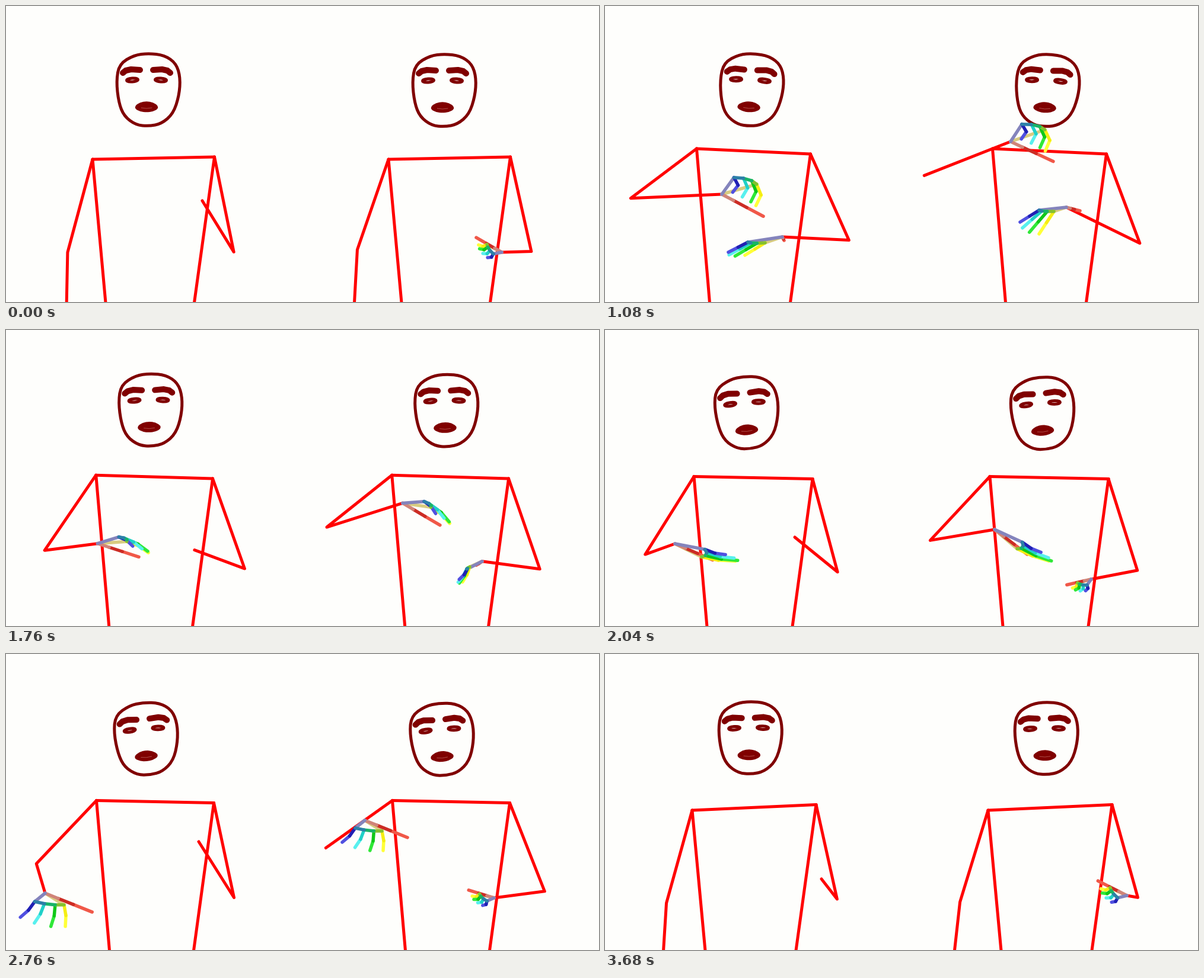
Recreate the animation shown at these times as an HTML page with a canvas. Size 1000 by 500 pixels, loop 3.72 s.

```html
<!DOCTYPE html>
<html lang="en">
<head>
<meta charset="utf-8">
<title>Signing figures</title>
<style>
html, body { margin: 0; width: 100%; height: 100%; overflow: hidden; background: #fefefc; }
canvas { display: block; }
</style>
</head>
<body>
<canvas id="stage" width="1000" height="500"></canvas>
<script>
const ctx = document.getElementById('stage').getContext('2d');
const LOOP = 3720, STEP = 40;
const TIMES = [0, 520, 1080, 1480, 2040, 2760, 3680];
const BG = '#fefefc', RED = '#ff0000', MAROON = '#800000';
const RAD = Math.PI / 180;

// Both people share these: shoulders (x, y, x, y), point between the eyes, head tilt in degrees
const torso = [
  [146, 259, 351.5, 255, 237, 125, 0],
  [149.5, 244.5, 351, 248.5, 242.5, 120.5, 1],
  [154.5, 241, 346.5, 250, 245, 125, 3],
  [154, 242.5, 347, 250.5, 246, 126, 3],
  [150, 247.5, 350, 251.5, 235, 123.5, -5],
  [152.5, 247.5, 350.5, 251.5, 232.5, 127, -5],
  [147, 264, 356, 254.5, 242, 125, -1]
];

// Hand shapes around the wrist: thumb tip, index and little knuckles,
// index and little fingertips, bend of the fingers
const SHAPES = {
  hang: [72, 29, 29, 18, -16, 13, 31, 51, -38, 37, 2],
  cup: [73, 31, 57, -22, 18, -30, 59, 14, 18, -5, 8],
  flat: [65, 24, 46, 20, 51, 7, 103, 24, 86, 14, -2],
  slope: [-23, 6, 21, 7, 46, 5, 46, 45, 78, 25, 0],
  reach: [-3, 6, 29, 10, 58, 9, 63, 31, 91, 26, 0],
  fist: [45, -21, 26, -11, 14, 4, 40, -9, 23, 11, -3]
};

// Each arm: swing from straight down, wrist, hand shape, its turn and scale
const people = [
  { x: 0, y: 0, arms: [
    arm(-1, [[15, 102, 510], [42, 18, 295], [53, 197, 318, 'cup', 5], [40, 189, 359, 'cup', -8],
      [32, 118, 361, 'flat', 3], [43.5, 66, 404, 'hang', 0, 1.1], [15.5, 98, 510]]),
    arm(1, [[11.5, 331, 329], [27.5, 376, 392, 'hang', -8], [24, 299, 390, 'reach'],
      [24, 314, 391, 'reach', 7], [15, 320, 350], [12, 325, 317], [12.5, 365, 380]])
  ] },
  { x: 499, y: 1, arms: [
    arm(-1, [[19, 88, 510], [57, 9, 268, 'hang', 0, .65], [68.5, 185, 229, 'cup', 2],
      [62.5, 178, 237, 'cup'], [43, 158, 337, 'flat', 17], [54.5, 106, 281, 'hang'], [17, 90, 505]]),
    arm(1, [[12.5, 337, 416, 'fist', -5], [32, 411, 389, 'hang'], [20.5, 279, 340, 'slope'],
      [21, 285, 355, 'slope', 11], [17.5, 321, 421, 'fist', 38, .85],
      [21.5, 324, 412, 'fist', 8, .9], [15.5, 381, 408, 'fist', -2, 1.1]])
  ] }
];

function shapeRow(side, name, turn = 0, scale = 1) {
  const s = SHAPES[name], c = Math.cos(turn * RAD) * scale, n = Math.sin(turn * RAD) * scale;
  const row = [];
  for (let k = 0; k < 10; k += 2) {
    row.push(-side * (s[k] * c - s[k + 1] * n), s[k] * n + s[k + 1] * c);
  }
  return [...row, -side * s[10]];
}

function arm(side, keys) {
  const known = keys.map(([, , , name, ...fit]) => name ? shapeRow(side, name, ...fit) : null);
  // Gaps take the shape of the nearest known hand
  const hand = known.map((row, i) => {
    for (let d = 0; !row; d++) row = known[i - d] || known[i + d];
    return row;
  });
  return { side, shown: known.map(Boolean), hand, joints: keys.map(k => k.slice(0, 3)) };
}

function spanAt(t) {
  let i = 0;
  while (i < TIMES.length - 2 && t >= TIMES[i + 1]) i++;
  return { i, u: Math.min(1, (t - TIMES[i]) / (TIMES[i + 1] - TIMES[i])) };
}

// Smooth cubic path through the rows
function poseAt(rows, t) {
  const { i, u } = spanAt(t), dt = TIMES[i + 1] - TIMES[i];
  const slope = (k, c) => {
    const a = Math.max(k - 1, 0), b = Math.min(k + 1, TIMES.length - 1);
    return (rows[b][c] - rows[a][c]) / (TIMES[b] - TIMES[a]) * dt;
  };
  const u2 = u * u, u3 = u2 * u;
  return rows[i].map((p, c) =>
    (2 * u3 - 3 * u2 + 1) * p + (u3 - 2 * u2 + u) * slope(i, c) +
    (3 * u2 - 2 * u3) * rows[i + 1][c] + (u3 - u2) * slope(i + 1, c));
}

const mix = (a, b, u) => [a[0] + (b[0] - a[0]) * u, a[1] + (b[1] - a[1]) * u];

function stroke(color, width) {
  ctx.strokeStyle = color;
  ctx.lineWidth = width;
  ctx.stroke();
}

function line(points, color, width) {
  ctx.beginPath();
  points.forEach(p => ctx.lineTo(...p));
  stroke(color, width);
}

// Closed smooth curve guided by the points
function loop(points, color, width) {
  const n = points.length;
  ctx.beginPath();
  ctx.moveTo(...mix(points[n - 1], points[0], .5));
  points.forEach((p, i) => ctx.quadraticCurveTo(...p, ...mix(p, points[(i + 1) % n], .5)));
  ctx.closePath();
  stroke(color, width);
}

const OUTLINE = [
  [-21, -42], [3, -45], [30, -42], [50, -28], [57, -4], [55, 26], [45, 57],
  [25, 74], [4, 78], [-18, 76], [-38, 61], [-47, 38], [-51, 2], [-46, -27]
];
const BROW = [[-40, -12], [-35, -16], [-26, -18], [-11, -17]];
const LIPS = [[-19, 1], [-10, -5], [0, -6.5], [10, -5], [19, 1], [10, 6], [0, 7], [-10, 6]];

function drawFace(x, y, tilt) {
  ctx.save();
  ctx.translate(x, y);
  ctx.rotate(tilt * RAD);
  loop(OUTLINE, MAROON, 5);
  for (const s of [-1, 1]) {
    line(BROW.map(([bx, by]) => [-s * bx, by]), MAROON, 10);
    ctx.beginPath();
    ctx.ellipse(s * 24, 0, 9.5, 2.9, s * .06, 0, 2 * Math.PI);
    stroke(MAROON, 5);
  }
  ctx.translate(0, 45);
  loop(LIPS, MAROON, 5);
  ctx.fillStyle = MAROON;
  ctx.fill();
  line([[-9, 2], [0, 3], [9, 2]], '#b8605a', .8);
  ctx.restore();
}

const FINGERS = [
  ['#f5ee14', '#ffff38'], ['#10c818', '#30e838'],
  ['#20d0c8', '#58f0ee'], ['#2020b4', '#5050e0']
];
const LINKS = ['#84c030', '#18b468', '#2c80a8'];

// Four evenly spread points, the middle two bulging away from the wrist
const fan = (a, b) => [0, 1, 2, 3].map(k => {
  const bulge = k % 3 ? 1.1 : 1;
  return mix(a, b, k / 3).map(v => v * bulge);
});

function drawHand(x, y, h) {
  const [thumb, first, last, tipA, tipB] = [0, 2, 4, 6, 8].map(k => [h[k], h[k + 1]]);
  const bend = h[10], W = 5.5, wrist = [0, 0];
  const knuckles = fan(first, last), tips = fan(tipA, tipB);
  const base = mix(wrist, thumb, .28), joint = mix(wrist, thumb, .6);
  ctx.save();
  ctx.translate(x, y);
  line([wrist, first], '#d8cc80', W);
  line([joint, thumb], '#f05848', W);
  line([base, joint], '#cc2c24', W);
  line([wrist, base], '#d08478', W);
  line([wrist, last], '#8484bc', W);
  knuckles.forEach((k, i) => {
    const dx = tips[i][0] - k[0], dy = tips[i][1] - k[1], len = Math.hypot(dx, dy) || 1;
    const push = Math.sign(bend) * Math.min(Math.abs(bend), len * .4) / len;
    const mid = [k[0] + dx * .5 + dy * push, k[1] + dy * .5 - dx * push];
    line([mid, tips[i]], FINGERS[i][1], W);
    line([k, mid], FINGERS[i][0], W);
  });
  LINKS.forEach((c, i) => line([knuckles[i], knuckles[i + 1]], c, W));
  ctx.restore();
}

function drawPerson({ x, y, arms }, t) {
  const { i, u } = spanAt(t);
  const [lx, ly, rx, ry, ex, ey, tilt] = poseAt(torso, t);
  const lift = i < 5 ? 6 * Math.sin(Math.PI * u) ** 2 : 0;
  const shoulders = [[lx, ly], [rx, ry]];
  ctx.save();
  ctx.translate(x, 0);
  drawFace(ex, ey + y - lift, tilt);
  line(shoulders, RED, 5);
  line([shoulders[0], [lx + 22, 501]], RED, 5);
  line([shoulders[1], [rx - 34, 501]], RED, 5);
  const poses = arms.map(({ joints }) => poseAt(joints, t));
  arms.forEach(({ side }, k) => {
    const [swing, wx, wy] = poses[k], a = swing * RAD, [sx, sy] = shoulders[k];
    // A raised upper arm looks shorter
    const reach = 100 + 65 * Math.cos(a);
    const elbow = [sx + side * reach * Math.sin(a), sy + reach * Math.cos(a)];
    line([shoulders[k], elbow, [wx, wy]], RED, 5);
  });
  arms.forEach(({ shown, hand }, k) => {
    if (shown[u < .5 ? i : i + 1]) drawHand(poses[k][1], poses[k][2], poseAt(hand, t));
  });
  ctx.restore();
}

function draw(t) {
  ctx.fillStyle = BG;
  ctx.fillRect(0, 0, 1000, 500);
  ctx.lineCap = ctx.lineJoin = 'round';
  people.forEach(p => drawPerson(p, t));
}

const start = performance.now();
function tick() {
  const t = (performance.now() - start) % LOOP;
  draw(Math.floor(t / STEP) * STEP);
  requestAnimationFrame(tick);
}
tick();
</script>
</body>
</html>
```
